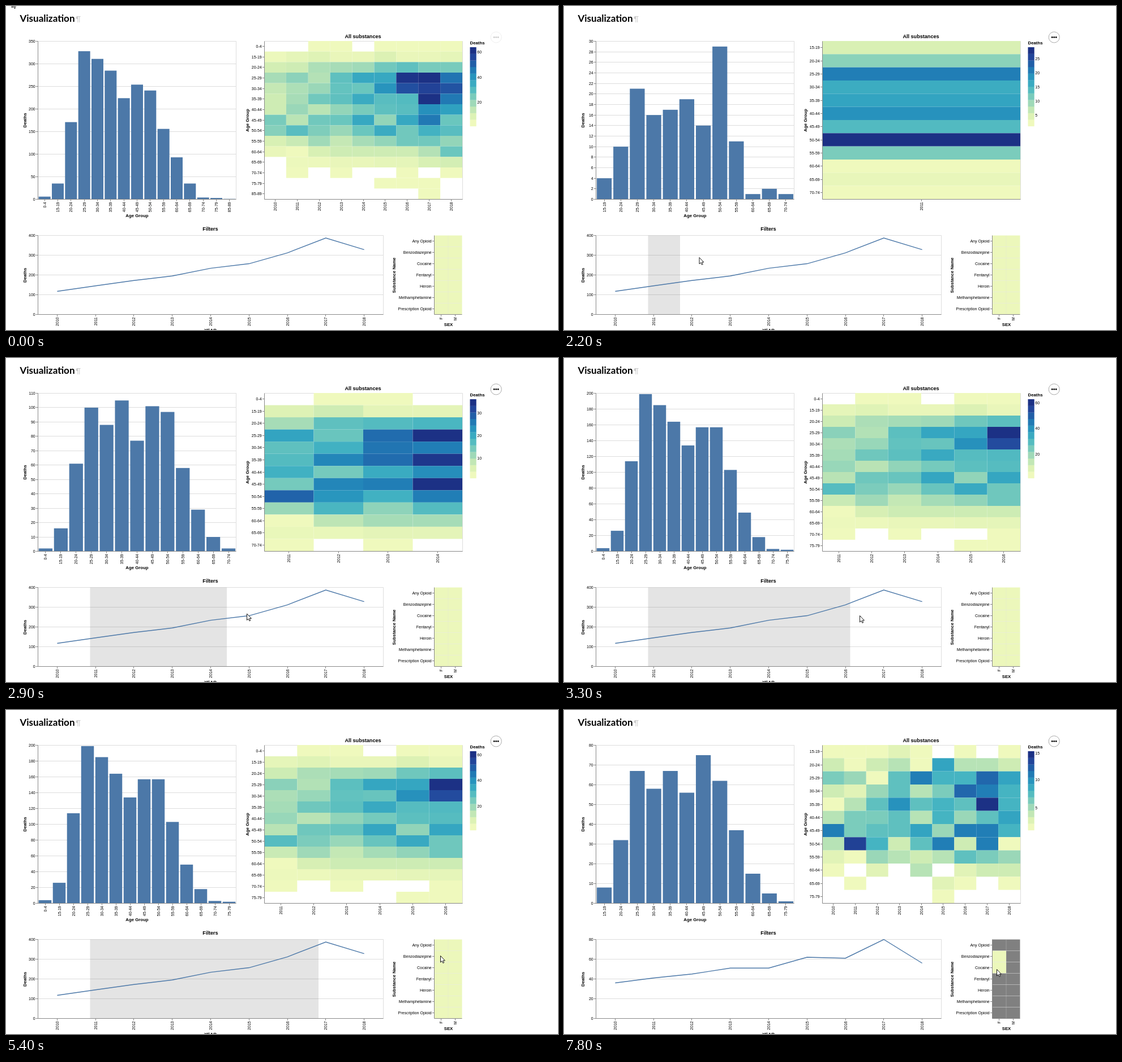
An HTML page that plays this animation: 975x574 px, repeating every 8 s.

```html
<!DOCTYPE html>
<html lang="en">
<head>
<meta charset="utf-8">
<title>Visualization</title>
<style>
  html, body { margin: 0; width: 100%; height: 100%; overflow: hidden; background: #fff; }
  svg { display: block; width: 975px; height: 574px; }
  text { font: 7px "Liberation Sans", Arial, sans-serif; fill: #000; }
  .axis-title { font-size: 7.8px; font-weight: bold; text-anchor: middle; }
  .title { font-size: 9.1px; font-weight: bold; text-anchor: middle; }
  .end { text-anchor: end; }
  .heading { font: bold 17px Lato, sans-serif; }
  .pilcrow { font: 13px Lato, sans-serif; fill: #ccc; }
  .grid { stroke: #ddd; fill: none; }
  .axis { stroke: #888; fill: none; }
  .bar { fill: #4c78a8; }
  .line { stroke: #4c78a8; stroke-width: 1.4; fill: none; }
  .brush { fill: #333; fill-opacity: .13; }
</style>
</head>
<body>
<svg viewBox="0 0 975 574">
  <text class="heading" x="24.5" y="27.5">Visualization</text>
  <text class="pilcrow" x="123" y="28">¶</text>
  <g id="charts"></g>
  <g id="menu">
    <circle cx="865.7" cy="55.4" r="9.6" fill="#fff" stroke="#aaa"/>
    <circle cx="862.2" cy="55.4" r="1.4"/><circle cx="865.7" cy="55.4" r="1.4"/><circle cx="869.2" cy="55.4" r="1.4"/>
  </g>
  <path id="cursor" d="M.5 .5V12L3.1 9.6L4.9 13.4L6.7 12.6L5 8.9H8.4Z" fill="#fff" stroke="#000" stroke-width=".9"/>
</svg>
<script>
const LOOP = 8000, STEP = 100;
const years = [2010, 2011, 2012, 2013, 2014, 2015, 2016, 2017, 2018];
const substances = ['Any Opioid', 'Benzodiazepine', 'Cocaine', 'Fentanyl', 'Heroin', 'Methamphetamine', 'Prescription Opioid'];
const scheme = ['eff9bd', 'dbf1b4', 'bde5b5', '94d5b9', '69c5be', '45b4c2', '2c9ec0', '2182b8', '2163aa', '23479c', '1c3185']
  .map(hex => [0, 2, 4].map(i => parseInt(hex.slice(i, i + 2), 16)));

// Deaths per age group, one value per year.
const everyone = {
  '0-4':   [0, 0, 1, 1, 0, 1, 1, 1, 1],
  '15-19': [2, 4, 6, 3, 3, 7, 3, 3, 4],
  '20-24': [9, 10, 16, 17, 18, 25, 28, 24, 24],
  '25-29': [17, 21, 15, 28, 36, 36, 63, 64, 48],
  '30-34': [12, 16, 19, 27, 26, 41, 56, 59, 55],
  '35-39': [10, 17, 25, 28, 35, 29, 30, 64, 47],
  '40-44': [10, 19, 14, 20, 24, 28, 29, 42, 38],
  '45-49': [24, 14, 25, 26, 36, 20, 36, 47, 26],
  '50-54': [22, 29, 23, 19, 26, 35, 25, 33, 29],
  '55-59': [8, 11, 18, 12, 17, 20, 25, 25, 20],
  '60-64': [3, 1, 8, 10, 10, 10, 10, 15, 26],
  '65-69': [0, 2, 2, 3, 3, 4, 4, 8, 9],
  '70-74': [0, 1, 0, 1, 0, 0, 1, 0, 1],
  '75-79': [0, 0, 0, 0, 0, 1, 1, 1, 0],
  '85-89': [0, 0, 0, 0, 0, 0, 0, 1, 0]
};
const oneSubstance = {
  '15-19': [1, 1, 0, 0, 1, 0, 0, 0, 1],
  '20-24': [3, 1, 3, 4, 1, 8, 4, 4, 3],
  '25-29': [5, 5, 1, 7, 9, 7, 5, 9, 8],
  '30-34': [2, 2, 5, 6, 2, 4, 8, 9, 6],
  '35-39': [0, 3, 6, 10, 6, 7, 2, 11, 5],
  '40-44': [2, 5, 5, 7, 4, 7, 3, 5, 4],
  '45-49': [7, 5, 6, 5, 7, 4, 6, 9, 5],
  '50-54': [3, 11, 7, 3, 6, 10, 2, 11, 1],
  '55-59': [2, 1, 3, 4, 3, 3, 3, 2, 3],
  '60-64': [1, 0, 2, 0, 3, 0, 0, 3, 3],
  '65-69': [0, 1, 0, 0, 0, 1, 1, 0, 1],
  '75-79': [0, 0, 0, 0, 0, 1, 0, 0, 0]
};
const twoSubstances = {
  '15-19': [1, 1, 1, 2, 1, 0, 1, 0, 1],
  '20-24': [3, 1, 3, 4, 1, 9, 4, 4, 3],
  '25-29': [6, 5, 1, 7, 11, 8, 8, 12, 9],
  '30-34': [3, 2, 5, 7, 4, 6, 12, 11, 8],
  '35-39': [1, 4, 7, 10, 7, 8, 7, 15, 8],
  '40-44': [4, 6, 6, 7, 4, 8, 5, 7, 9],
  '45-49': [11, 6, 7, 7, 9, 5, 11, 11, 8],
  '50-54': [4, 14, 8, 3, 7, 11, 3, 11, 1],
  '55-59': [2, 1, 5, 4, 3, 4, 7, 6, 5],
  '60-64': [1, 0, 2, 0, 4, 0, 2, 3, 3],
  '65-69': [0, 1, 0, 0, 0, 2, 1, 0, 1],
  '75-79': [0, 0, 0, 0, 0, 1, 0, 0, 0]
};

// Motion keys: time, then values.
const cursorKeys = [
  [0, 10, -9], [200, 10, -9], [300, 24, 45], [600, 90, 300], [900, 140, 440], [1000, 152, 453], [1100, 156, 443],
  [1200, 148, 441], [1800, 148, 441], [1900, 172, 442], [2500, 305, 448], [2700, 360, 450], [3100, 490, 455],
  [3200, 490, 455], [3300, 522, 456], [3600, 554, 448], [3800, 558, 441], [4100, 558, 441], [4500, 557, 440],
  [4700, 557, 440], [4800, 585, 446], [5000, 690, 457], [5200, 783, 447], [5400, 767, 435], [6200, 767, 435],
  [6300, 765, 446], [6400, 765, 446], [6600, 764, 459]
];
const brushKeys = [
  [1900, 160], [2200, 205], [2500, 245], [2700, 310], [3100, 470], [3200, 470],
  [3300, 505.5], [3600, 545], [3800, 550], [4100, 550], [4500, 552]
];
const BRUSH_START = 148.5, CLICK = 6100, RESET = 6300, SECOND_CLICK = 7700;

const sum = list => list.reduce((a, b) => a + b, 0);
const px = v => Math.floor(v) + .5;
const yearX = i => 56.5 + 610 / 9 * (i + .5);

function at(keys, t) {
  const next = keys.findIndex(k => k[0] > t);
  if (next < 0) return keys[keys.length - 1].slice(1);
  if (next === 0) return keys[0].slice(1);
  const a = keys[next - 1], b = keys[next], f = (t - a[0]) / (b[0] - a[0]);
  return a.slice(1).map((v, i) => v + (b[i + 1] - v) * f);
}

function color(f) {
  const p = Math.min(Math.max(f, 0), 1) * (scheme.length - 1), i = Math.min(Math.floor(p), scheme.length - 2);
  return `rgb(${scheme[i].map((c, k) => Math.round(c + (scheme[i + 1][k] - c) * (p - i)))})`;
}

function tickStep(span, count) {
  const raw = span / count, power = 10 ** Math.floor(Math.log10(raw)), e = raw / power;
  return power * (e >= Math.sqrt(50) ? 10 : e >= Math.sqrt(10) ? 5 : e >= Math.SQRT2 ? 2 : 1);
}

const text = (x, y, s, cls = '') => `<text class="${cls}" x="${x}" y="${y}">${s}</text>`;
const upright = (x, y, s, cls = 'end') => `<text class="${cls}" transform="translate(${x} ${y}) rotate(-90)">${s}</text>`;
const path = (d, cls) => `<path class="${cls}" d="${d}"/>`;
const rect = (x, y, w, h, attr) => `<rect x="${x}" y="${y}" width="${w}" height="${h}" ${attr}/>`;
const frame = (x, y, w, h) => path(`M${x} ${y}h${w}v${h}h${-w}z`, 'grid');
const axes = (x, y, w, h) => path(`M${x} ${y}v${h}h${w}`, 'axis');
const tickLeft = (x, y, s) => path(`M${x} ${px(y)}h-3.5`, 'axis') + text(x - 4.8, y + 2.5, s, 'end');
const tickBelow = (x, y, s) => path(`M${px(x)} ${y}v3.5`, 'axis') + upright(x + 2.5, y + 4.8, s);

function valueAxis(x, y, w, h, max, step) {
  let grid = frame(x, y, w, h), ticks = '';
  for (let v = 0; v <= max; v += step) {
    const ty = y + h - v / max * h;
    grid += path(`M${x} ${px(ty)}h${w}`, 'grid');
    ticks += tickLeft(x, ty, v);
  }
  return { grid, ticks };
}

function barChart(ages, rows) {
  const totals = rows.map(sum), top = Math.max(...totals), step = tickStep(top, 10);
  const max = Math.ceil(top / step) * step, band = 350 / ages.length;
  const { grid, ticks } = valueAxis(56.5, 62.5, 350, 280, max, step);
  const bars = totals.map((v, i) => {
    const h = v / max * 280;
    return rect(56.5 + band * (i + .05), 342.5 - h, band * .9, h, 'class="bar"');
  });
  return grid + bars.join('') + axes(56.5, 62.5, 350, 280) + ticks +
    ages.map((a, i) => tickBelow(56.5 + band * (i + .5), 342.5, a)).join('') +
    text(231.5, 374.3, 'Age Group', 'axis-title') + upright(35.7, 202.5, 'Deaths', 'axis-title');
}

function heatmap(ages, rows, labels) {
  const max = Math.max(...rows.flat()), w = 350 / labels.length, h = 280 / ages.length;
  let out = frame(456.5, 62.5, 350, 280);
  rows.forEach((row, r) => row.forEach((v, c) => {
    if (v) out += rect(456 + c * w, 62 + r * h, w, h, `fill="${color((v - 1) / (max - 1))}"`);
  }));
  out += axes(456.5, 62.5, 350, 280) + text(630.5, 56.8, 'All substances', 'title') +
    upright(429.3, 202.5, 'Age Group', 'axis-title') +
    ages.map((a, i) => tickLeft(456.5, 62 + h * (i + .5), a)).join('') +
    labels.map((y, i) => tickBelow(456 + w * (i + .5), 342.5, y)).join('');
  return out + legend(max);
}

function legend(max) {
  const blocks = 12, h = 140 / blocks, step = tickStep(max - 1, 4);
  let out = text(819.5, 68.3, 'Deaths', 'axis-title" style="text-anchor:start');
  for (let i = 0; i < blocks; i++)
    out += rect(819.5, 213 - (i + 1) * h, 11.2, h + .2, `fill="${color(i / (blocks - 1))}"`);
  for (let v = step; v <= max; v += step)
    out += text(832.3, Math.max(213 - (v - 1) / (max - 1) * 140, 76) + 2.5, v);
  return out;
}

function lineChart(data, brushEnd) {
  const totals = years.map((_, i) => sum(Object.values(data).map(row => row[i])));
  const top = Math.max(...totals), nice = tickStep(top, 10), max = Math.ceil(top / nice) * nice;
  const step = tickStep(max, 5), { grid, ticks } = valueAxis(56.5, 406.5, 610, 140, max, step);
  const points = totals.map((v, i) => `${yearX(i)} ${546.5 - v / max * 140}`);
  return grid + (brushEnd ? rect(BRUSH_START, 406.5, brushEnd - BRUSH_START, 140, 'class="brush"') : '') +
    path('M' + points.join('L'), 'line') + axes(56.5, 406.5, 610, 140) + ticks +
    years.map((y, i) => tickBelow(yearX(i), 546.5, y)).join('') +
    text(361, max % step ? 401.5 : 398, 'Filters', 'title') +
    text(361, 577.3, 'YEAR', 'axis-title') + upright(35.7, 477, 'Deaths', 'axis-title');
}

function filterPanel(selected) {
  let out = '';
  substances.forEach((name, r) => {
    for (let c = 0; c < 2; c++) {
      const on = !selected.length || (c === 0 && selected.includes(name));
      out += rect(756.5 + c * 24.5, 406.5 + r * 20, 24.5, 20, `fill="${on ? '#ecf7bb' : '#808080'}"`);
    }
    if (r) out += path(`M757 ${406.5 + r * 20}h48.5`, 'grid" stroke-opacity=".35');
    out += tickLeft(756.5, 416.3 + r * 20, name);
  });
  return out + path('M781 406.5v140', 'grid" stroke-opacity=".3') + axes(756.5, 406.5, 49, 140) +
    tickBelow(768.5, 546.5, 'F') + tickBelow(793, 546.5, 'M') +
    text(781.5, 567, 'SEX', 'axis-title') + upright(688.3, 477, 'Substance Name', 'axis-title');
}

function charts(t) {
  const brushEnd = t >= 1900 && t < CLICK ? at(brushKeys, t)[0] : 0;
  const limit = t >= 1900 && t < RESET ? at(brushKeys, t)[0] : 0;
  const data = t < CLICK ? everyone : t < SECOND_CLICK ? oneSubstance : twoSubstances;
  const selected = t < CLICK ? [] : substances.slice(1, t < SECOND_CLICK ? 2 : 3);
  const inRange = (_, i) => !limit || (yearX(i) >= BRUSH_START && yearX(i) <= limit);
  const ages = Object.keys(data).filter(a => sum(data[a].filter(inRange)));
  const rows = ages.map(a => data[a].filter(inRange));
  return barChart(ages, rows) + heatmap(ages, rows, years.filter(inRange)) +
    lineChart(data, brushEnd) + filterPanel(selected);
}

const byId = id => document.getElementById(id);
const start = performance.now();
let shown = -1;

function draw(now) {
  const t = Math.floor(Math.max(now - start, 0) % LOOP / STEP) * STEP;
  if (t !== shown) {
    shown = t;
    byId('charts').innerHTML = charts(t);
    byId('menu').setAttribute('opacity', t < 300 ? .2 : 1);
    byId('cursor').setAttribute('transform', `translate(${at(cursorKeys, t)})`);
  }
  requestAnimationFrame(draw);
}
draw(start);
</script>
</body>
</html>
```
